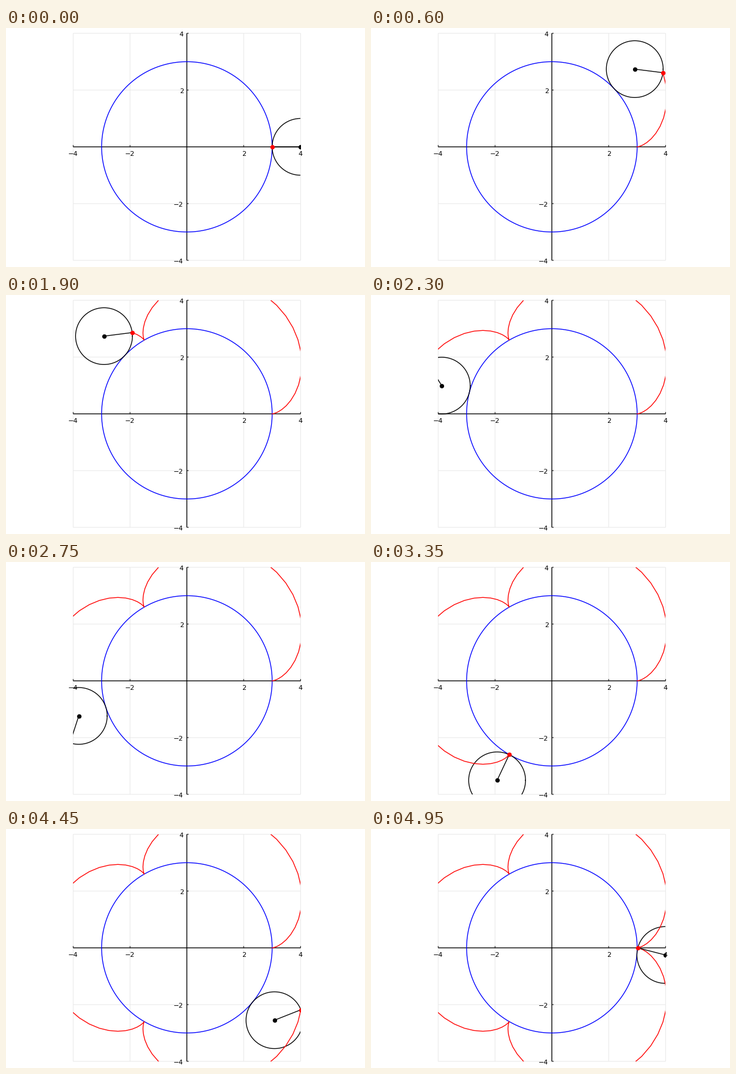
Recreate the animation shown at these times as a matplotlib script. Size 600 px wide and 400 px high, loop 5 s.

```python
import matplotlib.pyplot as plt
import numpy as np
from matplotlib.animation import FuncAnimation
from matplotlib.patches import Rectangle

W, H, DPI = 600, 400, 100
UNIT = 47.5              # pixels per data unit
CX, CY = 302.3, 198.9    # origin, in pixels from the top left
FRAMES, INTERVAL = 100, 50
R, r = 3, 1              # fixed and rolling radius


def pt(px):
    return px * 72 / DPI


def pen(t):
    k = (R + r) / r
    return (R + r) * np.cos(t) - r * np.cos(k * t), (R + r) * np.sin(t) - r * np.sin(k * t)


fig = plt.figure(figsize=(W / DPI, H / DPI), dpi=DPI, facecolor="white")
ax = fig.add_axes([0, 0, 1, 1])
ax.set_axis_off()
ax.set_xlim(-CX / UNIT, (W - CX) / UNIT)
ax.set_ylim((CY - H) / UNIT, CY / UNIT)

window = Rectangle((-4, -4), 8, 8, transform=ax.transData)


def line(x, y, color="black", width=1.35, clip=True, **kw):
    artist, = ax.plot(x, y, color=color, lw=pt(width), snap=False, **kw)
    if clip:
        artist.set_clip_path(window)
    return artist


def rule(x, y, color="black", width=1.35):
    return line(x, y, color, width, clip=False, solid_capstyle="butt")


def dot(color):
    return line([], [], color, marker="o", ms=pt(7.4), mew=0, ls="none")


def label(x, y, value, ha):
    text = str(value).replace("-", "\u2212")
    ax.text(x, y, text, ha=ha, va="baseline", family="DejaVu Sans", size=8)


ticks = (-4, -2, 2, 4)
for v in ticks:
    rule([v, v], [-4, 4], "#e8e8e8", 1)
    rule([-4, 4], [v, v], "#e8e8e8", 1)
rule([-4, 4], [0, 0])
rule([0, 0], [-4, 4])
for v in ticks:
    rule([v, v], [0, 3 / UNIT], width=1)
    rule([0, 3 / UNIT], [v, v], width=1)
    label(v, -15.1 / UNIT, v, "center")
    label(-5.5 / UNIT, v - 5.1 / UNIT, v, "right")

turn = np.linspace(0, 2 * np.pi, 201)
line(R * np.cos(turn), R * np.sin(turn), "blue")
wheel = line([], [])
trail = line([], [], "red")
spoke = line([], [])
hub = dot("black")
tip = dot("red")


def update(i):
    t = 2 * np.pi * np.arange(i + 1) / FRAMES
    x, y = pen(t)
    cx, cy = (R + r) * np.cos(t[-1]), (R + r) * np.sin(t[-1])
    wheel.set_data(cx + r * np.cos(turn), cy + r * np.sin(turn))
    trail.set_data(x, y)
    spoke.set_data([cx, x[-1]], [cy, y[-1]])
    hub.set_data([cx], [cy])
    tip.set_data([x[-1]], [y[-1]])
    return wheel, trail, spoke, hub, tip


anim = FuncAnimation(fig, update, frames=FRAMES, interval=INTERVAL, repeat=True)
plt.show()
```
